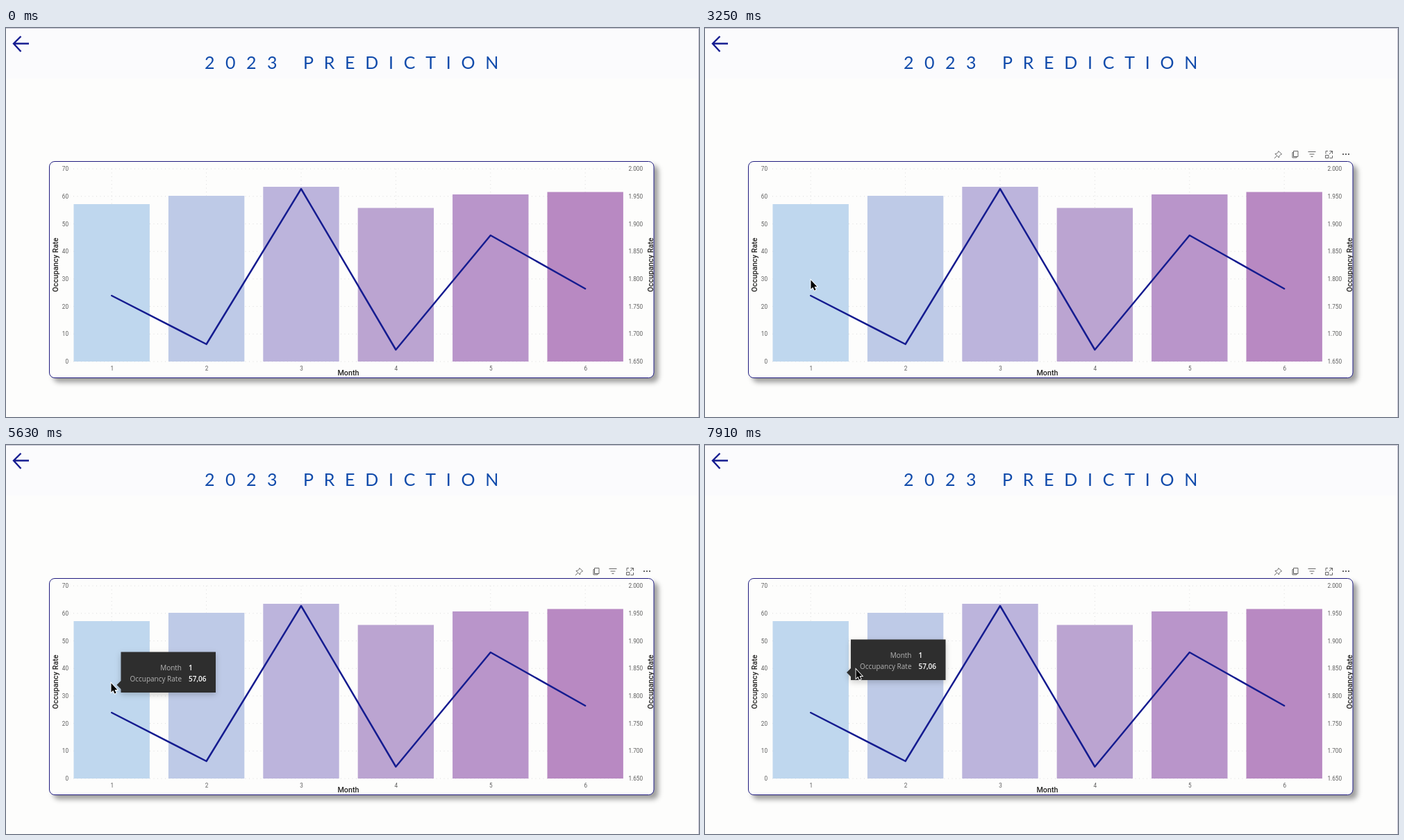
These frames come from a looping animation (998x561 px, 8000 ms). An HTML page:

```html
<!DOCTYPE html>
<html lang="en">
<head>
<meta charset="utf-8">
<title>2023 Prediction</title>
<style>
html, body { margin: 0; width: 100%; height: 100%; overflow: hidden; background: #fdfdfc; }
svg { display: block; width: 998px; height: 561px; }
.title { font: 25px Lato, sans-serif; letter-spacing: 15.5px; fill: #114bab; }
.title tspan { letter-spacing: 14.75px; }
.tick { font: 8.2px Roboto, sans-serif; fill: #5c5c5c; }
.axis { font: 500 10.8px Roboto, sans-serif; fill: #252423; text-anchor: middle; }
.tip { font: 10px "Open Sans", sans-serif; fill: #b4b4b4; }
.tip .value { font-weight: 600; fill: #fff; }
.grid { stroke: #dcdcdc; stroke-width: 1; stroke-dasharray: 1 4.5; }
.icons { fill: none; stroke: #666; stroke-width: 1; }
.end { text-anchor: end; }
.mid { text-anchor: middle; }
</style>
</head>
<body>
<svg viewBox="0 0 998 561">
  <defs>
    <filter id="cardShadow" x="-5%" y="-5%" width="112%" height="115%">
      <feDropShadow dx="6" dy="6" stdDeviation="3.6" flood-color="#000" flood-opacity=".38"/>
    </filter>
    <filter id="tipShadow" x="-20%" y="-30%" width="140%" height="170%">
      <feDropShadow dx="0" dy="3" stdDeviation="4" flood-color="#000" flood-opacity=".2"/>
    </filter>
    <clipPath id="cardClip"><rect x="63" y="193" width="870" height="311" rx="7"/></clipPath>
  </defs>

  <rect width="998" height="561" fill="#fdfdfc"/>
  <rect width="998" height="73" fill="#fbfbfd"/>
  <path d="M0 .5H997.5V561" fill="none" stroke="#c3c2d2"/>
  <path d="M33 22.5H11M21.5 12L11 22.5L21.5 34" fill="none" stroke="#151c90" stroke-width="2.4"/>
  <text class="title" x="286" y="58.5">2023 <tspan>PREDICTION</tspan></text>

  <rect x="62.5" y="192.5" width="870.5" height="312" rx="7.5" fill="#fdfdfc" stroke="#211f80" filter="url(#cardShadow)"/>
  <g id="chart" clip-path="url(#cardClip)">
    <text class="axis" x="493" y="501">Month</text>
    <text class="axis" transform="translate(75.3 341.5) rotate(-90)">Occupancy Rate</text>
    <text class="axis" transform="translate(932 341.5) rotate(-90)">Occupancy Rate</text>
  </g>

  <g id="icons" class="icons">
    <path d="M826 177.5l4.5 4.5l-1.5 .5l-2 2l-.5 2.5l-5.5 -5.5l2.5 -.5l2 -2zM823.5 184.5l-3.5 3.5"/>
    <path d="M847.5 177.5h6.5v8h-6.5zM847.5 179.5h-1.5v7.5h6v-1.5"/>
    <path d="M868.5 178.5h11M870.5 182h7M872.5 185.5h3"/>
    <path d="M897 177.5h-3v4M899.5 177.5h4v4M903.5 184v3.5h-4M903.5 177.5l-4.5 4.5M893.5 183.5h4.5v4h-4.5z"/>
    <path d="M918 182h10" stroke-width="2" stroke-dasharray="2 2"/>
  </g>

  <g id="tip" class="tip">
    <path d="M14.5 -44.5h136.5v58.5h-136.5v-5l-6 -6l6 -6z" fill="#2f2f2f" filter="url(#tipShadow)"/>
    <text class="end" x="102" y="-18">Month</text>
    <text class="value" x="112" y="-18">1</text>
    <text class="end" x="102" y="-2.3">Occupancy Rate</text>
    <text class="value" x="112" y="-2.3">57,06</text>
  </g>
  <path id="cursor" d="M.5 .5V13.5L3.3 10.8L5.5 15.5L7.6 14.5L5.5 10H9.3z" fill="#000" stroke="#fff" stroke-width="1.8" paint-order="stroke"/>
</svg>
<script>
const LOOP = 8000, ICONS_AT = 2600, TIP_AT = 5300, MOVE_END = 7910, TIP_LAG = 50;
const byId = id => document.getElementById(id);
const chart = byId('chart'), icons = byId('icons'), tip = byId('tip'), cursor = byId('cursor');

function add(name, attrs, text) {
  const el = document.createElementNS('http://www.w3.org/2000/svg', name);
  for (const key in attrs) el.setAttribute(key, attrs[key]);
  if (text !== undefined) el.textContent = text;
  chart.append(el);
}

const BASE = 481, STEP = 39.7;
const monthX = i => 152.2 + i * 136.4;
const bars = [
  [254, '#bfd7ee'], [242, '#becae7'], [229, '#bcb4dc'],
  [259.5, '#bba4d1'], [240, '#b995ca'], [236.5, '#b889c2']
];
const lineY = [386, 456, 232, 464, 299, 376];

function buildChart() {
  for (let i = 0; i < 8; i++) {
    const y = BASE - i * STEP;
    add('path', { class: 'grid', d: `M97 ${y}H889` });
    add('text', { class: 'tick end', x: 90, y: y + 3 }, i * 10);
    add('text', { class: 'tick', x: 896.5, y: y + 3 }, ((1650 + i * 50) / 1000).toFixed(3));
  }
  bars.forEach(([top, fill], i) => {
    const x = monthX(i);
    add('path', { class: 'grid', d: `M${x} 203V${BASE}` });
    add('rect', { x: x - 54.7, y: top, width: 109.4, height: BASE - top, fill });
    add('text', { class: 'tick mid', x: x + 0.5, y: 493.5 }, i + 1);
  });
  add('polyline', {
    points: lineY.map((y, i) => `${monthX(i)},${y}`).join(' '),
    fill: 'none', stroke: '#151c90', 'stroke-width': 2.5,
    'stroke-linecap': 'round', 'stroke-linejoin': 'round'
  });
}

// Pointer path: time, x, y
const path = [
  [2200, 212, 562], [2270, 207.5, 547], [2600, 172, 440], [2900, 154, 372],
  [3250, 152, 363], [3700, 151, 343], [7600, 151, 343], [7860, 195.5, 325], [MOVE_END, 217, 323]
];

function pointerAt(t) {
  let i = 1;
  while (i < path.length - 1 && t > path[i][0]) i++;
  const [t0, x0, y0] = path[i - 1], [t1, x1, y1] = path[i];
  const k = Math.min(1, Math.max(0, (t - t0) / (t1 - t0)));
  return [x0 + (x1 - x0) * k, y0 + (y1 - y0) * k];
}

const show = (el, on) => el.setAttribute('visibility', on ? 'visible' : 'hidden');
const place = (el, pos) => el.setAttribute('transform', `translate(${pos})`);

function render(t) {
  show(cursor, t >= path[0][0]);
  show(icons, t >= ICONS_AT);
  show(tip, t >= TIP_AT);
  place(cursor, pointerAt(t));
  place(tip, pointerAt(Math.min(t, MOVE_END) - TIP_LAG));
}

buildChart();
render(0);
const start = performance.now();
function tick() {
  render((performance.now() - start) % LOOP);
  requestAnimationFrame(tick);
}
requestAnimationFrame(tick);
</script>
</body>
</html>
```
